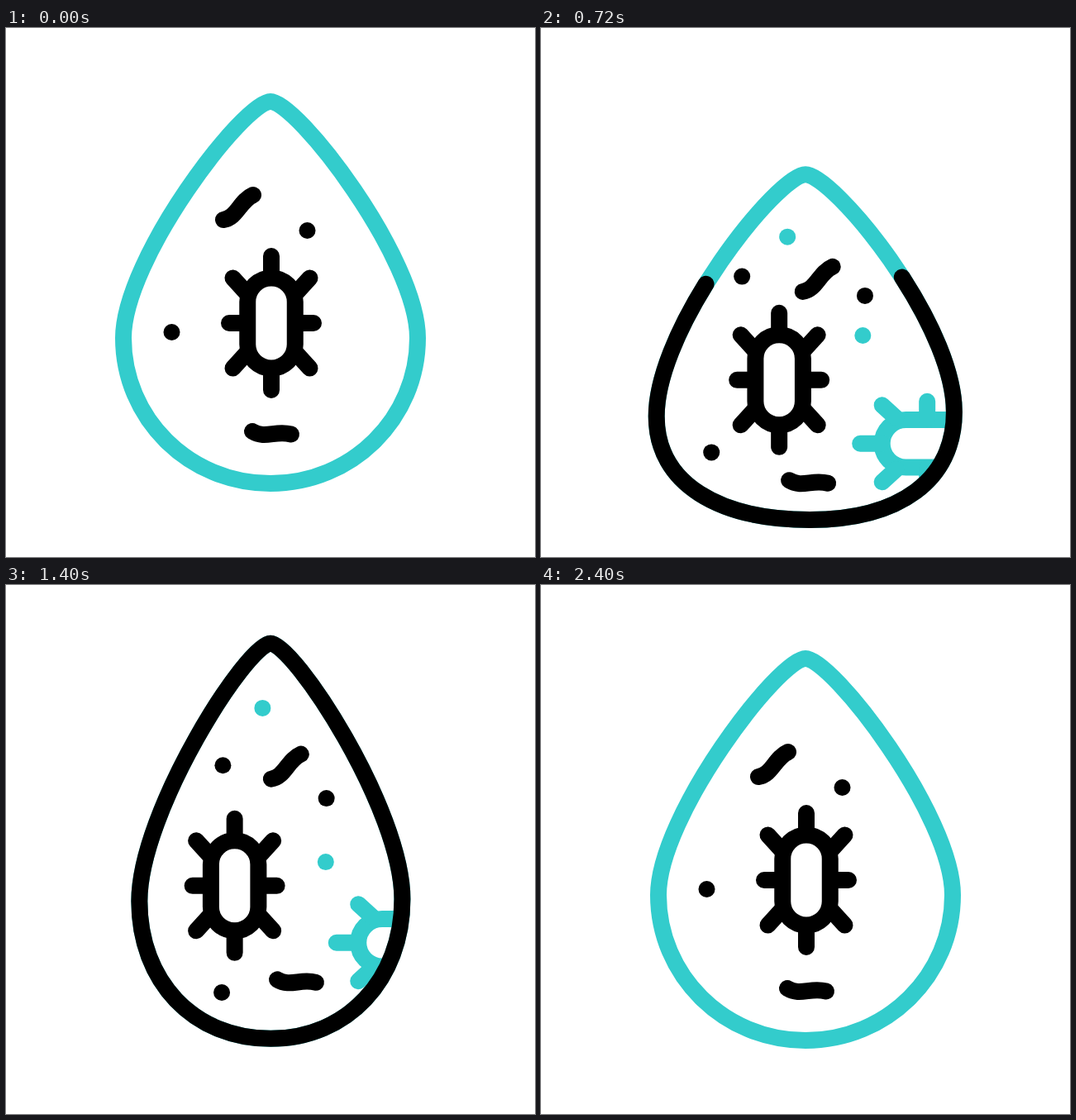
Write an HTML page that moves like this. It is 640 px wide and 640 px high and loops after 2600 ms.

```html
<!DOCTYPE html>
<html lang="en">
<head>
<meta charset="utf-8">
<title>Drop with microbes</title>
<style>
  html, body { margin: 0; width: 100%; height: 100%; overflow: hidden; background: #fff; }
  svg { display: block; width: 100vw; height: 100vh; }
  .line { fill: none; stroke-width: 20; stroke-linecap: round; stroke-linejoin: round; }
</style>
</head>
<body>
<svg viewBox="0 0 640 640">
  <defs>
    <clipPath id="inside"><path id="mask"/></clipPath>
    <g id="microbe">
      <rect x="-28.75" y="-54.5" width="57.5" height="109" rx="28.75"/>
      <path d="M0-81V-55M0 81V55M-51 0H-30M51 0H30M-46.5-54.5L-31-37.5M46.5-54.5L31-37.5M-46.5 54.5L-31 37.5M46.5 54.5L31 37.5"/>
    </g>
    <path id="dot" d="M0 0h.01"/>
    <path id="slantWorm" d="M-18 15C-2 13 2-8 18-15"/>
    <path id="flatWorm" d="M-23.5-1.5C-7.5 8 4-3 23.5 2"/>
  </defs>
  <g id="contents" class="line" clip-path="url(#inside)"></g>
  <path id="rim" class="line" stroke="#33cccc"/>
  <path id="trace" class="line" stroke="#000" pathLength="1"/>
</svg>
<script>
const LOOP = 2600, STEP = 40;
const TEAL = '#33cccc', BLACK = '#000';
const byId = id => document.getElementById(id);
const lerp = (a, b, k) => a + (b - a) * k;
const clamp01 = v => Math.min(1, Math.max(0, v));

// Cubic timing curve through (x1, 0) and (x2, 1).
function ease(u, x1, x2) {
  u = clamp01(u);
  let low = 0, high = 1;
  for (let i = 0; i < 30; i++) {
    const p = (low + high) / 2, q = 1 - p;
    if (3 * q * q * p * x1 + 3 * q * p * p * x2 + p ** 3 < u) low = p; else high = p;
  }
  return u === 1 ? 1 : low * low * (3 - 2 * low);
}

// Rest -> squashed -> stretched -> rest.
const PHASES = [[262, 952], [952, 1637], [1637, 2400]];

function phaseAt(t) {
  const index = t < PHASES[1][0] ? 0 : t < PHASES[2][0] ? 1 : 2;
  const [start, end] = PHASES[index];
  return { index, u: clamp01((t - start) / (end - start)) };
}

// topY, top handle, upper side handle, left x/y, right x/y, bottom x/y, lower side handle, bottom handle
const DROP = [
  [89, 32, 96, 142, 375, 498, 375, 320, 551, 97, 99],
  [192.5, 33, 112, 139.3, 486, 500.2, 480, 326, 602.5, 80, 110],
  [47.6, 27, 108, 165.5, 363, 475.5, 361, 319, 538.7, 100, 90]
];

function dropPath({ index, u }) {
  const k = ease(u, 2 / 3, 1 / 3), next = DROP[(index + 1) % 3];
  const [top, tip, up, lx, ly, rx, ry, bx, by, down, base] =
    DROP[index].map((v, i) => lerp(v, next[i], k));
  return `M320 ${top}C${320 + tip} ${top} ${rx} ${ry - up} ${rx} ${ry}` +
    `C${rx} ${ry + down} ${bx + base} ${by} ${bx} ${by}` +
    `C${bx - base} ${by} ${lx} ${ly + down} ${lx} ${ly}` +
    `C${lx} ${ly - up} ${320 - tip} ${top} 320 ${top}Z`;
}

// poses: position at rest, squashed, stretched; bend: sideways bow of the path per phase
const ITEMS = [
  { shape: 'microbe', color: TEAL, turn: 90, poses: [[572, 458], [451.5, 510.5], [486.3, 418]], bend: [[-4, 0]] },
  { shape: 'dot', color: TEAL, poses: [[356, 84], [290.2, 276.5], [314.2, 124.8]], bend: [[-3.4, 8.9]] },
  { shape: 'dot', color: TEAL, poses: [[476, 256], [374.4, 392], [389.8, 321.8]], bend: [[0, 0], [-1, 4]] },
  { shape: 'microbe', color: BLACK, settle: .45, poses: [[321, 357], [276.8, 442.3], [276.6, 349]], bend: [[2.2, 3.6]] },
  { shape: 'dot', color: BLACK, poses: [[178, 217], [254.4, 315], [262, 200]], bend: [[0, 0], [3, 0]] },
  { shape: 'dot', color: BLACK, poses: [[200.5, 368], [207.2, 534.3], [267.1, 482]], bend: [[0, 7], [6.5, 5]] },
  { shape: 'dot', color: BLACK, poses: [[364.5, 245], [395.2, 335.7], [386.2, 243.4]], bend: [[2.5, 3]] },
  { shape: 'slantWorm', color: BLACK, poses: [[281, 217], [341, 316.5], [338.4, 201.3]], bend: [[5, 4]] },
  { shape: 'flatWorm', color: BLACK, poses: [[321.5, 489.5], [324, 558.3], [354.8, 463.8]], bend: [[0, 1], [3, 0]] }
];

for (const item of ITEMS) {
  item.node = document.createElementNS('http://www.w3.org/2000/svg', 'use');
  item.node.setAttribute('href', '#' + item.shape);
  item.node.setAttribute('stroke', item.color);
  byId('contents').append(item.node);
}

function placeItem({ node, poses, bend = [], settle = 1 / 3, turn = 0 }, { index, u }) {
  const k = ease(u, 2 / 3, index === 0 ? settle : 1 / 3);
  const from = poses[index], to = poses[(index + 1) % 3], bow = bend[index] || [0, 0];
  const [x, y] = from.map((v, i) => lerp(v, to[i], k) + bow[i] * 4 * k * (1 - k));
  node.setAttribute('transform', `translate(${x} ${y}) rotate(${turn})`);
}

// The black line grows round the rim, then its tail catches up, while it slowly turns.
function drawTrace(t) {
  const trace = byId('trace');
  const head = ease((t - 240) / 960, .6, .2);
  const tail = ease((t - 1400) / 980, .6, .2);
  const turn = .0003 * (t - 240);
  const length = head - tail;
  trace.style.display = length > .0001 ? '' : 'none';
  trace.setAttribute('stroke-dasharray', length > .9999 ? 'none' : `${length} ${1 - length}`);
  trace.setAttribute('stroke-dashoffset', -(turn + tail) % 1);
}

function render(time) {
  const t = Math.floor((time % LOOP) / STEP) * STEP;
  const phase = phaseAt(t);
  const outline = dropPath(phase);
  for (const id of ['mask', 'rim', 'trace']) byId(id).setAttribute('d', outline);
  for (const item of ITEMS) placeItem(item, phase);
  drawTrace(t);
}

function tick() {
  render(performance.now());
  requestAnimationFrame(tick);
}
tick();
</script>
</body>
</html>
```
